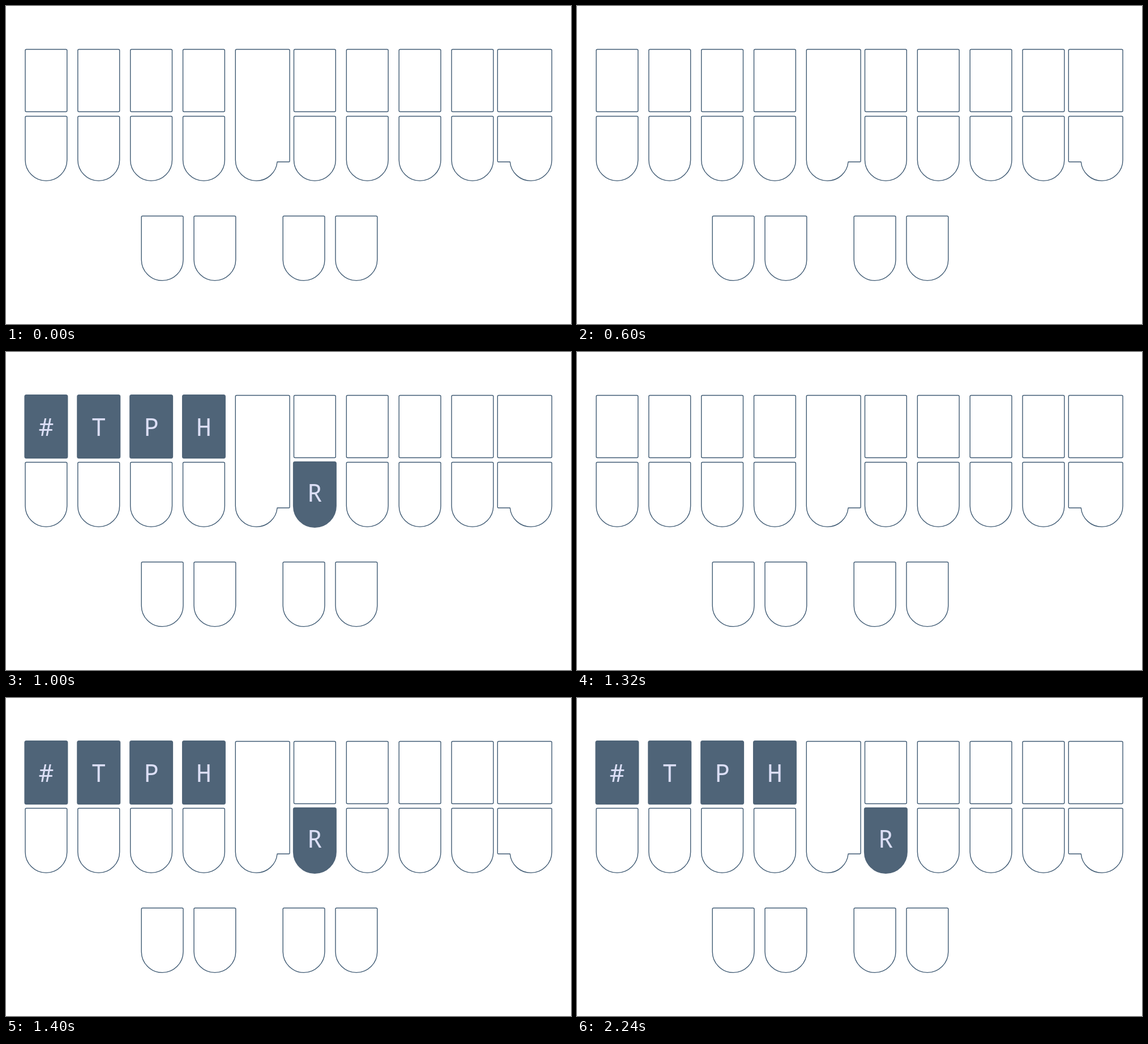
These frames come from a looping animation (998x561 px, 2.8 s). An HTML page:

```html
<!DOCTYPE html>
<html lang="en">
<head>
<meta charset="utf-8">
<title>Steno chord</title>
<style>
  html, body { margin: 0; width: 100%; height: 100%; overflow: hidden; background: #fff; }
  svg { display: block; width: 100vw; height: 100vh; }
  path { fill: #fff; stroke: #3f5a73; stroke-width: 1.4; stroke-linejoin: round; }
  #chord path { fill: #4f6478; stroke: #4f6478; stroke-width: 3.2; }
  text {
    font: 500 44px "Noto Sans Mono", "DejaVu Sans Mono", monospace;
    font-stretch: semi-condensed;
    fill: #dcdff6;
    text-anchor: middle;
  }
</style>
</head>
<body>
<svg viewBox="0 0 998 561">
  <g id="board"></g>
  <g id="chord" visibility="hidden"></g>
</svg>
<script>
const NS = "http://www.w3.org/2000/svg";
const board = document.getElementById("board");
const chord = document.getElementById("chord");
const W = 73.8, WIDE = 95.8, R = W / 2, PITCH = 92.85;
const TOP = 76.5, LOW = 194.5, THUMB = 370.5;
const LEFT = 34, RIGHT = 508.5, STAR = 405.3, LAST = 868.3;

function add(parent, tag, attrs, content = "") {
  const el = document.createElementNS(NS, tag);
  for (const name in attrs) el.setAttribute(name, attrs[name]);
  el.textContent = content;
  parent.append(el);
}

// Top edge with small rounded corners, starting below the left one.
const cap = (x, y, w) => `M${x} ${y + 2}q0-2 2-2h${w - 4}q2 0 2 2`;

const box = (x, y, w = W) =>
  `${cap(x, y, w)}V${y + 108}q0 2-2 2h${4 - w}q-2 0-2-2Z`;

const tongue = (x, y) =>
  `${cap(x, y, W)}V${y + 77}a${R} ${R} 0 0 1 ${-W} 0Z`;

// Wide keys have a shoulder beside the rounded end.
const starKey = x =>
  `${cap(x, TOP, WIDE)}V273.5q0 1.5-1.5 1.5H${x + W}` +
  `A${R} ${R} 0 0 1 ${x + R} 308.4A${R} ${R} 0 0 1 ${x} 271.5Z`;

const lastKey = x =>
  `${cap(x, LOW, WIDE)}V271.5A${R} ${R} 0 0 1 ${x + WIDE - R} 308.4` +
  `A${R} ${R} 0 0 1 ${x + WIDE - W} 275H${x + 1.5}q-1.5 0-1.5-1.5Z`;

const key = d => add(board, "path", { d });

function press(label, d, x, baseline) {
  add(chord, "path", { d });
  add(chord, "text", { x: x + R, y: baseline }, label);
}

for (const start of [LEFT, RIGHT]) {
  for (let i = 0; i < 4; i++) {
    const x = start + i * PITCH;
    key(box(x, TOP));
    key(tongue(x, LOW));
  }
}
key(starKey(STAR));
key(box(LAST, TOP, WIDE));
key(lastKey(LAST));
for (const x of [239.2, 332, 489.2, 582]) key(tongue(x, THUMB));

[..."#TPH"].forEach((label, i) => {
  const x = LEFT + i * PITCH;
  press(label, box(x, TOP), x, 148);
});
press("R", tongue(RIGHT, LOW), RIGHT, 264);

function render(ms) {
  const t = ms % 2800;
  const pressed = (t >= 1000 && t < 1200) || t >= 1400;
  chord.setAttribute("visibility", pressed ? "visible" : "hidden");
}

const began = performance.now();
function tick() {
  render(performance.now() - began);
  requestAnimationFrame(tick);
}
tick();
</script>
</body>
</html>
```
